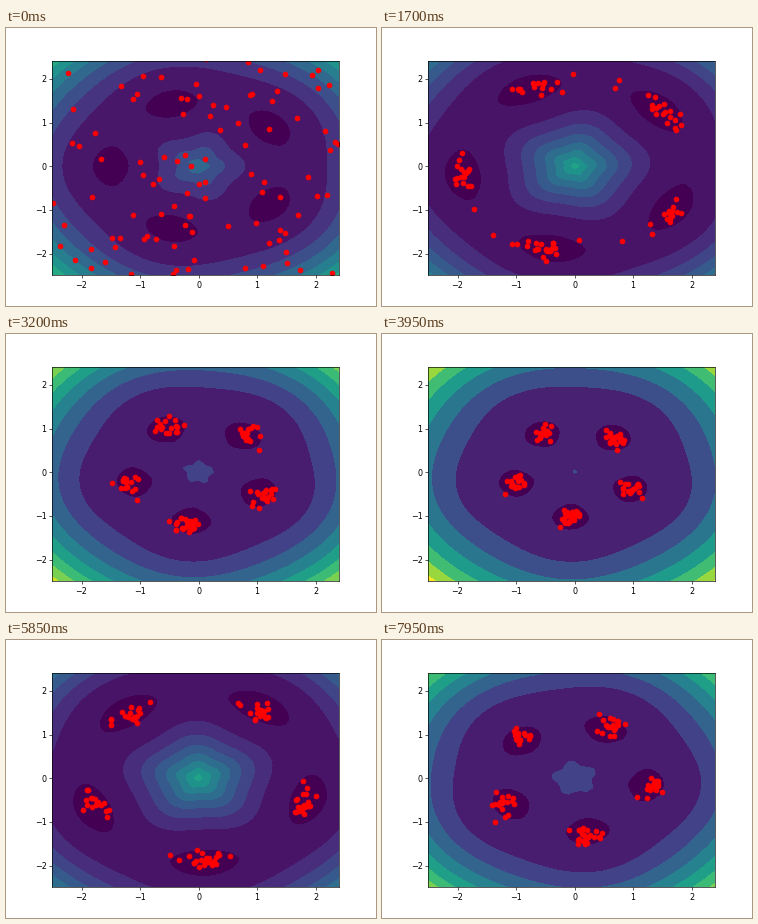
Recreate the animation shown at these times as a matplotlib script. Size 370 by 278 pixels, loop 8000 ms.

```python
import numpy as np
import matplotlib.pyplot as plt
from matplotlib.animation import FuncAnimation

FRAMES, INTERVAL = 160, 50
COUNT = 100          # particles
WAVE = 0.1           # depth of the angular wells
RATE, NOISE = 0.1, 0.06


def phase(k):
    return 2 * np.pi * k / 400


def radius(k):
    return 1.5 + 0.5 * np.sin(2 * np.pi * k / 100)


def height(x, y, k):
    r, a = np.hypot(x, y), np.arctan2(y, x)
    return (r - radius(k)) ** 2 + WAVE * np.cos(5 * a - phase(k))


def slope(x, y, k):
    r, a = np.maximum(np.hypot(x, y), 0.2), np.arctan2(y, x)
    radial = 2 * (r - radius(k))
    across = -5 * WAVE / r * np.sin(5 * a - phase(k))
    return np.array([radial * np.cos(a) - across * np.sin(a),
                     radial * np.sin(a) + across * np.cos(a)])


def swarm_path():
    """Noisy gradient descent from a uniform scatter, one entry per frame."""
    rng = np.random.RandomState(7)
    p = rng.uniform(-2.5, 2.5, (2, COUNT))
    path = [p]
    for k in range(1, FRAMES):
        p = p - RATE * slope(*p, k) + rng.normal(0, NOISE, p.shape)
        path.append(p)
    return path


axis = np.arange(50) * 0.1 - 2.5
X, Y = np.meshgrid(axis, axis)
path = swarm_path()

fig, ax = plt.subplots(figsize=(6.4, 4.80865), dpi=57.8125)
dots, = ax.plot([], [], "ro")
ax.set_xlim(-2.5, 2.4)
ax.set_ylim(-2.5, 2.4)
field = None


def draw(k):
    global field
    if field is not None:
        field.remove()
    field = ax.contourf(X, Y, height(X, Y, k), vmin=-WAVE, vmax=6.52)
    dots.set_data(*path[k])
    return [dots]


anim = FuncAnimation(fig, draw, frames=FRAMES, init_func=lambda: draw(0),
                     interval=INTERVAL, repeat=True, repeat_delay=0)
plt.show()
```
